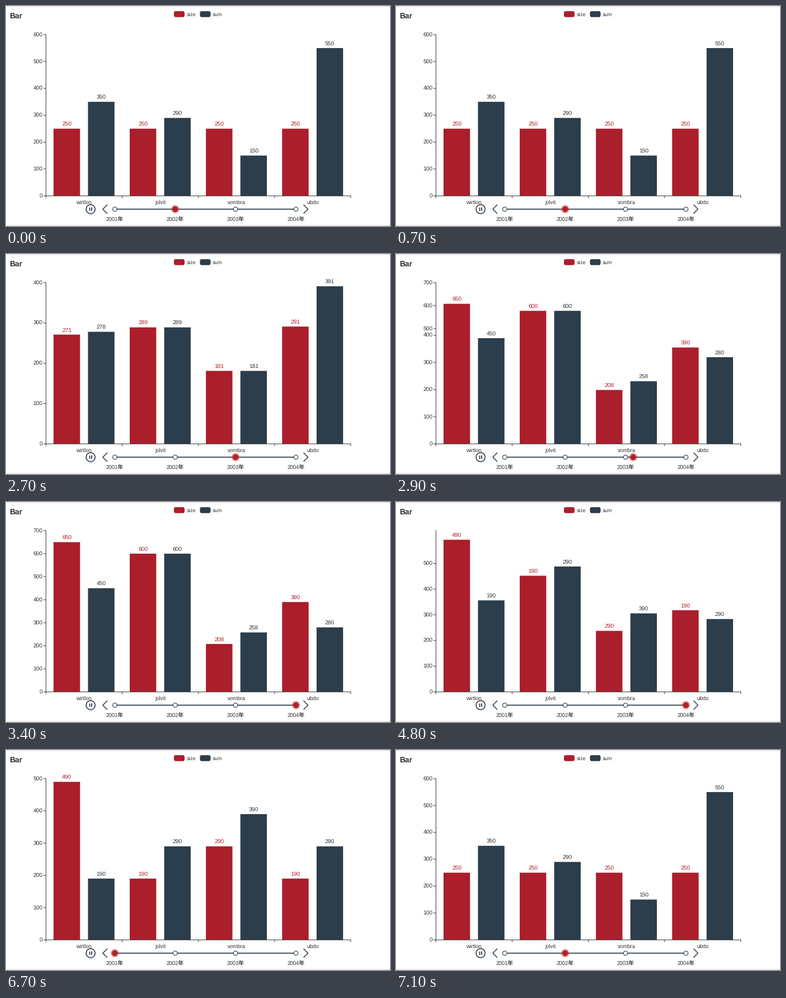
Recreate the animation shown at these times as a matplotlib script. Size 686 by 392 pixels, loop 7200 ms.

```python
import matplotlib.pyplot as plt
from matplotlib.animation import FuncAnimation
from matplotlib.patches import Circle, FancyBboxPatch, Rectangle

W, H, DPI = 686, 392, 64
PT = 72 / DPI  # points per pixel
RED, DARK, INK = "#ab1e2b", "#2c3d4b", "#333333"

FRAMES, INTERVAL = 72, 100
FIRST_SWITCH, SWITCH_GAP, SWITCH_TIME = 804, 1982, 300

LEFT, RIGHT, TOP, BASE = 71.3, 615.8, 51, 338.3
BAND = (RIGHT - LEFT) / 4
BAR = BAND * 0.8 / 2.3
TIME_Y = 362
STOPS = [194.3, 302.2, 410.1, 518]

CATEGORIES = ["wirtlon", "jolvit", "vombra", "ubdo"]
# per year: (axis maximum, size values, sum values)
YEARS = [
    (500, [490, 190, 290, 190], [190, 290, 390, 290]),
    (600, [250, 250, 250, 250], [350, 290, 150, 550]),
    (400, [271, 289, 181, 291], [278, 289, 181, 391]),
    (700, [650, 600, 208, 390], [450, 600, 258, 280]),
]

plt.rcParams.update({
    "path.snap": False,
    "text.hinting": "none",
    "font.family": ["Liberation Sans", "Noto Sans CJK JP"],
})
fig = plt.figure(figsize=(W / DPI, H / DPI), dpi=DPI, facecolor="white")
ax = fig.add_axes([0, 0, 1, 1])
ax.set_xlim(0, W)
ax.set_ylim(H, 0)
ax.axis("off")


def label(x, y, text, size=9.6, color=INK, ha="center", weight="normal"):
    """Text whose capital height is centred on y."""
    rise = 0.35 * size
    item = ax.text(x, y + rise, text, fontsize=size * PT, color=color,
                   ha=ha, va="baseline", weight=weight, zorder=6)
    item.rise = rise
    return item


def line(xs, ys, color=INK, width=1.0, z=3):
    return ax.plot(xs, ys, color=color, lw=width * PT, zorder=z,
                   solid_capstyle="butt", solid_joinstyle="miter")[0]


def draw_frame():
    line([0, W], [0.5, 0.5], "#d2d2d2")
    line([0, W], [H - 0.5, H - 0.5], "#d2d2d2")
    label(6.5, 16.7, "Bar", 13.8, ha="left", weight="bold")
    for x, color, name in ((300, RED, "size"), (346.5, DARK, "sum")):
        ax.add_patch(FancyBboxPatch((x + 3, 12.2), 13, 4.6, fc=color, lw=0,
                                    boxstyle="round,pad=3,rounding_size=3"))
        label(x + 22.5, 14.6, name, 9.4, ha="left")


def draw_axes():
    line([LEFT, LEFT], [TOP - 0.5, BASE + 0.5])
    line([LEFT - 0.5, RIGHT + 0.5], [BASE, BASE])
    for i in range(5):
        x = LEFT + i * BAND
        line([x, x], [BASE, BASE + 4])
    for i, name in enumerate(CATEGORIES):
        label(LEFT + (i + 0.5) * BAND, 349.2, name)


def draw_timeline():
    line([STOPS[0], STOPS[-1]], [TIME_Y] * 2, DARK, 1.7)
    for i, x in enumerate(STOPS):
        ax.add_patch(Circle((x, TIME_Y), 3.8, fc="white", ec=DARK,
                            lw=1.1 * PT, zorder=5))
        label(x, 379.4, f"{2001 + i}年")
    ax.add_patch(Circle((151.2, TIME_Y), 8, fc="none", ec=DARK, lw=1.6 * PT))
    for x in (149.5, 153):
        line([x, x], [359, 365], DARK, 1.8)
    arrow_y = [TIME_Y - 8, TIME_Y, TIME_Y + 8]
    line([181, 173, 181], arrow_y, DARK, 1.5)
    line([531.5, 539.3, 531.5], arrow_y, DARK, 1.5)


draw_frame()
draw_axes()
draw_timeline()

pointer = ax.add_patch(Circle((0, TIME_Y), 5.2, fc=RED, lw=0, zorder=7))
halo = ax.add_patch(Circle((0, TIME_Y), 5.2, fc="none", lw=4 * PT, zorder=8,
                           ec=(0.76, 0.21, 0.19, 0.5)))
ticks = [(line([LEFT - 4.2, LEFT], [0, 0]),
          label(65.4, 0, str(v), 10.2, ha="right")) for v in range(0, 800, 100)]

bars = []
for series, color, text_color in ((1, RED, RED), (2, DARK, INK)):
    for i in range(4):
        x = LEFT + (i + 0.1) * BAND + (series - 1) * 1.3 * BAR
        patch = ax.add_patch(Rectangle((x, BASE), BAR, 0, fc=color, lw=0, zorder=2))
        bars.append((series, i, patch, label(x + BAR / 2, 0, "", 10.3, text_color)))


def cubic_out(t):
    return 1 - (1 - t) ** 3


def quintic_in_out(t):
    return 16 * t ** 5 if t < 0.5 else 1 - 16 * (1 - t) ** 5


def mix(a, b, p):
    return a + (b - a) * p


def height_of(value, top):
    return BASE - value / top * (BASE - TOP)


def update(frame):
    ms = frame * INTERVAL
    step = (ms - FIRST_SWITCH) // SWITCH_GAP
    t = min(1, (ms - FIRST_SWITCH - step * SWITCH_GAP) / SWITCH_TIME)
    now, before = (step + 2) % 4, (step + 1) % 4
    new, old = YEARS[now], YEARS[before]
    p = cubic_out(t)

    for series, i, patch, text in bars:
        value = new[series][i]
        y = mix(height_of(old[series][i], old[0]), height_of(value, new[0]), p)
        patch.set_y(y)
        patch.set_height(BASE - y)
        text.set_text(str(value))
        text.set_y(y - 8 + text.rise)

    # ticks absent from the previous scale appear directly in place
    for k, (mark, text) in enumerate(ticks):
        value = k * 100
        y = height_of(value, new[0])
        if value <= old[0]:
            y = mix(height_of(value, old[0]), y, p)
        mark.set_ydata([y, y])
        text.set_y(y + text.rise)
        for item in (mark, text):
            item.set_visible(value <= new[0])

    x = mix(STOPS[before], STOPS[now], quintic_in_out(t))
    for dot in (pointer, halo):
        dot.center = (x, TIME_Y)
    return []


animation = FuncAnimation(fig, update, frames=FRAMES, interval=INTERVAL,
                          repeat=True, repeat_delay=0)
plt.show()
```
